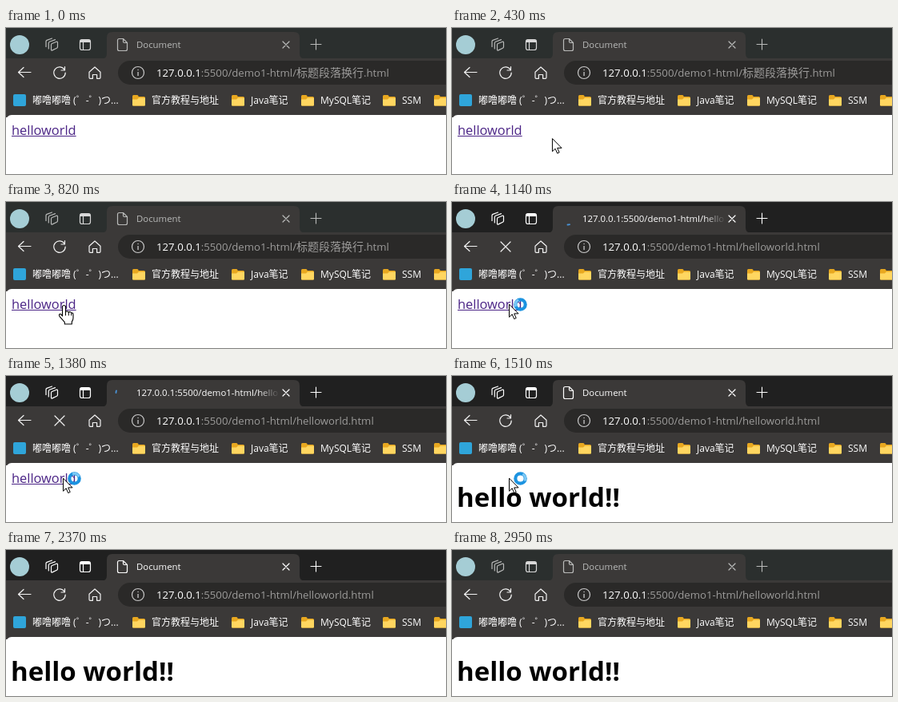
These frames come from a looping animation (550x183 px, 3000 ms). An HTML page with a canvas:

```html
<!DOCTYPE html>
<html lang="zh-CN">
<head>
<meta charset="utf-8">
<title>Browser link demo</title>
<style>
html, body { margin: 0; width: 100%; height: 100%; overflow: hidden; background: #fff; }
canvas { display: block; width: 550px; height: 183px; }
</style>
</head>
<body>
<canvas id="stage"></canvas>
<script>
const W = 550, H = 183, LOOP = 3000;
const FONT = '"Open Sans", "Noto Sans CJK SC", "Noto Sans CJK", "Noto Sans", sans-serif';
const canvas = document.getElementById('stage');
const ctx = canvas.getContext('2d');
const dpr = window.devicePixelRatio || 1;
canvas.width = W * dpr;
canvas.height = H * dpr;

// Moments in ms
const ENTER = 200, ARRIVE = 700, HAND = 750, CLICK = 1020, LOAD = 1100,
  SHOW = 1480, IDLE = 1690, LEAVE = 1910, GONE = 2370, BLUR = 2950;

const ARROW = new Path2D('M.5 .5V16.3L4.2 12.8L6.7 18.6L9.2 17.5L6.7 11.9H11.7Z');
const POINTER = new Path2D('M-2 1.4Q0 -1.4 2 1.4V8.2Q4.2 6.6 5.8 8.8Q8 7.2 9.2 9.6Q11.4 8.8 11.5 11.8V16Q11.5 18 9.8 20.6V23.5H.8V21.2L-5.6 13.8Q-6.8 11.2 -4.8 10.8Q-3.4 11 -2 13.4Z');
const KNUCKLES = new Path2D('M2 8V12.5M5.8 9V12.5M9.2 10V12.5');
const PAGE = new Path2D('M141.5 13.5H146.5L151.5 18.5V26.5Q151.5 28.5 149.5 28.5H141.5Q139.5 28.5 139.5 26.5V15.5Q139.5 13.5 141.5 13.5ZM146.5 13.5V17Q146.5 18.5 148 18.5H151.5');
const SPACES = new Path2D('M57.5 19.5L63 17.2Q64.5 16.8 64.5 18.3V23.5Q64.5 24.8 63.4 25.3L58 27.9Q56.5 28.4 56.5 27V21Q56.5 19.9 57.5 19.5ZM53.3 26V19Q53.3 17.8 54.4 17.3L61.5 14.6M50 23.5V17Q50 15.9 51 15.4L57.5 13');
const HOME = new Path2D('M104 55.2L111 49L118 55.2V62Q118 63.3 116.7 63.3H113.6V58.5H108.4V63.3H105.3Q104 63.3 104 62Z');
const BACK = new Path2D('M31 55.5H15.5M22 49.5L15.5 55.5L22 61.5');
const RELOAD = new Path2D('M73.3 52.6A7.2 7.2 0 1 0 74.2 56M73.5 48.6V53H69');

function stroke(path, color, width = 1.3) {
  ctx.strokeStyle = color;
  ctx.lineWidth = width;
  ctx.stroke(path);
}

function box(x, y, w, h, r, color) {
  ctx.fillStyle = color;
  ctx.beginPath();
  ctx.roundRect(x, y, w, h, r);
  ctx.fill();
}

function disc(x, y, r, color) {
  ctx.fillStyle = color;
  ctx.beginPath();
  ctx.arc(x, y, r, 0, Math.PI * 2);
  ctx.fill();
}

function arc(x, y, r, from, to, color, width) {
  ctx.strokeStyle = color;
  ctx.lineWidth = width;
  ctx.beginPath();
  ctx.arc(x, y, r, from, to);
  ctx.stroke();
}

function cross(x, y, r, color, width) {
  stroke(new Path2D(`M${x - r} ${y - r}L${x + r} ${y + r}M${x + r} ${y - r}L${x - r} ${y + r}`), color, width);
}

// Draws text and returns the x where it ends
function text(str, x, y, size, color, weight = 400) {
  ctx.font = `${weight} ${size}px ${FONT}`;
  ctx.fillStyle = color;
  ctx.fillText(str, x, y);
  return x + ctx.measureText(str).width;
}

function folder(x) {
  box(x, 84, 7.5, 6, 1.5, '#e8a820');
  box(x, 86, 16, 11.5, 1.5, '#e8a820');
  ctx.fillStyle = '#ffd660';
  ctx.fill(new Path2D(`M${x} 89.5H${x + 6}L${x + 8} 87.5H${x + 16}V96.5Q${x + 16} 97.5 ${x + 15} 97.5H${x + 1}Q${x} 97.5 ${x} 96.5Z`));
}

function tabStrip(t, active, loading) {
  const ink = active ? '#fff' : '#b9bab9';
  const bright = active ? '#fff' : '#d8d8d8';
  ctx.fillStyle = active ? '#202020' : '#2b2f2e';
  ctx.fillRect(0, 0, W, 39);
  disc(17, 21, 12, '#a5cdd5');
  stroke(SPACES, ink, 1.2);

  ctx.beginPath();
  ctx.roundRect(92.5, 14.5, 13, 13, 2.5);
  ctx.strokeStyle = bright;
  ctx.lineWidth = 1.2;
  ctx.stroke();
  box(92.5, 14.5, 13, 3.5, [2, 2, 0, 0], bright);
  stroke(new Path2D('M96.5 18V27.5'), bright, 1.2);

  ctx.fillStyle = '#3b3938';
  ctx.fill(new Path2D('M119 39Q126 39 126 32V12Q126 5 133 5H360Q367 5 367 12V32Q367 39 374 39Z'));

  if (loading) {
    const a = Math.PI + (t - 1380) / 130;
    arc(145, 21, 7.5, a, a + 0.35, '#4a93d6', 1.8);
    const fade = ctx.createLinearGradient(315, 0, 342, 0);
    fade.addColorStop(0, '#fff');
    fade.addColorStop(1, 'rgba(255,255,255,0)');
    text('127.0.0.1:5500/demo1-html/hello', 163, 25, 11.4, fade);
  } else {
    stroke(PAGE, ink, 1.2);
    text('Document', 163, 25, 11.4, ink);
  }
  cross(350, 21, 4, ink, 1.2);
  stroke(new Path2D('M381 20.5H394M387.5 14V27'), ink, 1.1);
}

function toolbar(clicked, loading) {
  ctx.fillStyle = '#3b3938';
  ctx.fillRect(0, 38, W, 74);
  stroke(BACK, '#f2f2f2', 1.2);
  if (loading) cross(67, 56, 6, '#f2f2f2', 1.2);
  else stroke(RELOAD, '#f2f2f2', 1.2);
  stroke(HOME, '#f2f2f2', 1.2);

  box(140, 41, 450, 30, 15, '#2a2928');
  arc(165, 56, 7.5, 0, Math.PI * 2, '#c9c9c9', 1.2);
  box(164.4, 55, 1.3, 5, 0, '#c9c9c9');
  box(164.3, 51.8, 1.5, 1.5, 0.7, '#c9c9c9');

  const dim = '#9c9b9a';
  let x = text('127.0.0.1', 188, 60.5, 13.2, '#fff', 500);
  x = text(':5500/demo1-html/', x, 60.5, 13.2, dim);
  x = clicked ? text('helloworld', x, 60.5, 13.2, dim) : text('标题段落换行', x, 60.5, 14, dim);
  text('.html', x, 60.5, 13.2, dim);

  box(9, 83, 16, 15, 2, '#2fa5da');
  text('嘟噜嘟噜 (゜-゜)つ...', 33, 95, 12, '#fff');
  const marks = [[158, '官方教程与地址'], [282, 'Java笔记'], [369, 'MySQL笔记'], [471, 'SSM'], [535, '']];
  for (const [left, label] of marks) {
    folder(left);
    text(label, left + 24, 95, 12, '#fff');
  }
}

function page(shown) {
  box(0, 109, W + 20, 90, [7, 0, 0, 0], '#fff');
  if (shown) {
    text('hello world!!', 6, 164, 33, '#000', 700);
  } else {
    const end = text('helloworld', 7, 134, 16.4, '#4b2486');
    ctx.fillRect(7, 135, end - 7, 1);
  }
}

function arrow(x, y) {
  ctx.save();
  ctx.translate(x, y);
  ctx.fillStyle = '#fff';
  ctx.fill(ARROW);
  stroke(ARROW, '#000', 1);
  ctx.restore();
}

function hand(x, y) {
  ctx.save();
  ctx.translate(x, y);
  ctx.fillStyle = '#fff';
  ctx.fill(POINTER);
  stroke(POINTER, '#000', 1.1);
  stroke(KNUCKLES, '#000', 1);
  ctx.restore();
}

function beam(x, y) {
  const path = new Path2D(`M${x - 3} ${y - 8.5}H${x - 1}L${x} ${y - 7.5}L${x + 1} ${y - 8.5}H${x + 3}M${x} ${y - 7.5}V${y + 7.5}M${x - 3} ${y + 8.5}H${x - 1}L${x} ${y + 7.5}L${x + 1} ${y + 8.5}H${x + 3}`);
  stroke(path, '#fff', 2.6);
  stroke(path, '#000', 1.1);
}

function busyRing(t) {
  const a = (t - 1510) / 150 - 0.9;
  arc(85.5, 128.5, 6.2, 0, Math.PI * 2, '#1c93e0', 4.2);
  arc(85.5, 128.5, 6.2, a, a + 1.2, '#7cc8f5', 3);
}

function cursor(t) {
  if (t < ENTER || t >= GONE) return;
  if (t < HAND) {
    const left = Math.max(0, 1 - (t - ENTER) / (ARRIVE - ENTER)) ** 2;
    arrow(71 + 185 * left, 128 + 36 * left);
  } else if (t < LOAD) {
    hand(t < 820 ? 71.5 : 72.5, 129.5);
  } else if (t < LEAVE) {
    arrow(71, 128);
    if (t < IDLE) busyRing(t);
  } else {
    const u = t - LEAVE;
    const x = 71 + 0.693 * u + 0.00031 * u * u;
    const y = 128 + 0.0895 * u + 0.00007 * u * u;
    if (y > 130 && x < 210) beam(Math.round(x) + 0.5, Math.floor(y));
    else arrow(x, y);
  }
}

function draw(now) {
  const t = now % LOOP;
  const loading = t >= LOAD && t < SHOW;
  ctx.setTransform(dpr, 0, 0, dpr, 0, 0);
  ctx.lineJoin = 'round';
  ctx.lineCap = 'round';
  tabStrip(t, t >= CLICK && t < BLUR, loading);
  toolbar(t >= LOAD, loading);
  page(t >= SHOW);
  cursor(t);
}

let start;
function tick(now) {
  start ??= now;
  draw(now - start);
  requestAnimationFrame(tick);
}
draw(0);
requestAnimationFrame(tick);
</script>
</body>
</html>
```
